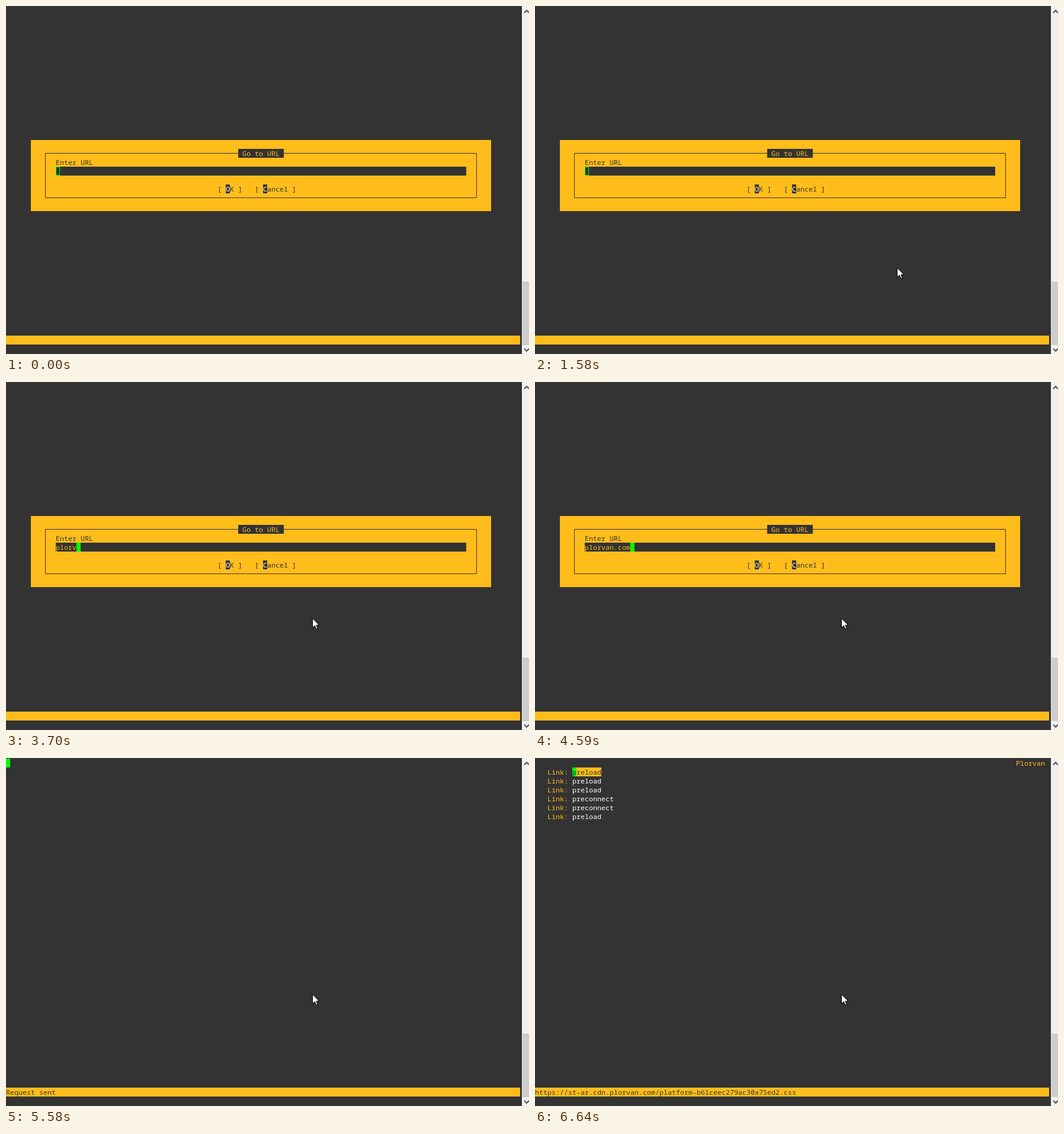
These frames come from a looping animation (883 by 587 pixels, 8 s). An HTML page with a canvas:

```html
<!DOCTYPE html>
<html lang="en">
<head>
<meta charset="utf-8">
<title>Text browser</title>
<style>
  html, body { margin: 0; width: 100%; height: 100%; overflow: hidden; background: #333; }
  canvas { display: block; }
</style>
</head>
<body>
<canvas id="stage" width="883" height="587"></canvas>
<script>
const ctx = document.getElementById('stage').getContext('2d');
const LOOP = 8000, CELL = 7, ROW = 15;
const DARK = '#333333', AMBER = '#ffbd1b', GREEN = '#00ff00', WHITE = '#ffffff';

const URL_TEXT = 'plorvan.com';
const KEY_TIMES = [2840, 3040, 3240, 3430, 3700, 3900, 3970, 4170, 4390, 4490, 4590];
const FOCUS_AT = 1850, SUBMIT_AT = 4790, PAGE_AT = 6440;

// [start, ...values]: the last entry already started is the current one
const POINTER = [
  [250, 724, 527], [320, 650, 470], [390, 613, 441],
  [1580, 611, 441], [1650, 588, 431], [1720, 555, 416], [1780, 530, 404], [1850, 517, 398]
];
const STATUS = [
  [4790, 'Looking up host'], [4990, 'Making connection'], [5190, 'Request sent'],
  [5380, 'SSL negotiation'], [5580, 'Request sent'],
  [6440, 'https://st-ar.cdn.plorvan.com/platform-b61ceec279ac30a75ed2.css']
];
const LINKS = ['preload', 'preload', 'preload', 'preconnect', 'preconnect', 'preload'];

const current = (steps, t) => steps.filter(step => step[0] <= t).pop();
const rowY = row => 1 + row * ROW;

function rect(x, y, w, h, color) {
  ctx.fillStyle = color;
  ctx.fillRect(x, y, w, h);
}

function text(str, x, row, color, back) {
  if (back) rect(x, rowY(row), str.length * CELL, ROW, back);
  ctx.fillStyle = color;
  [...str].forEach((ch, i) => ctx.fillText(ch, x + i * CELL, rowY(row) + 12));
}

function polyline(points, color, width) {
  ctx.beginPath();
  points.forEach(([x, y]) => ctx.lineTo(x, y));
  ctx.strokeStyle = color;
  ctx.lineWidth = width;
  ctx.stroke();
}

function scrollbar() {
  rect(871, 0, 12, 587, '#f0f0f0');
  rect(872, 465, 11, 107, '#cdcdcd');
  polyline([[875, 11.5], [879, 7.5], [883, 11.5]], '#505050', 2);
  polyline([[875, 578], [879, 582], [883, 578]], '#505050', 2);
}

function button(label, x) {
  text(`[ ${label} ]`, x, 20, DARK);
  text(label[0], x + 2 * CELL, 20, WHITE, DARK);
}

function dialog(t) {
  rect(42, 226, 777, 120, AMBER);
  rect(66, 248, 729, 1, DARK);
  rect(66, 323, 729, 1, '#5a2d28');
  rect(66, 248, 1, 76, '#5a2d28');
  rect(794, 248, 1, 76, '#5a2d28');
  text(' Go to URL ', 392, 16, AMBER, DARK);
  text('Enter URL', 84, 17, DARK);
  button('OK', 357);
  button('Cancel', 420);

  rect(84, 271, 693, ROW, DARK);
  const typed = KEY_TIMES.filter(time => time <= t).length;
  text(URL_TEXT.slice(0, typed), 84, 18, AMBER);
  const x = 84 + typed * CELL;
  rect(x, 271, CELL, ROW, GREEN);
  if (t < FOCUS_AT) rect(x + 1, 272, CELL - 2, ROW - 2, DARK);
}

function page() {
  text('Plorvan', 812, 0, AMBER);
  LINKS.forEach((name, i) => {
    text('Link:', 21, i + 1, AMBER);
    text(name, 63, i + 1, i ? WHITE : DARK, i ? null : AMBER);
  });
  text('p', 63, 1, DARK, GREEN);
}

function pointer(x, y) {
  ctx.save();
  ctx.translate(x, y);
  ctx.beginPath();
  [[0.5, 0.8], [0.5, 16.6], [4.3, 13], [6.8, 18.5], [9.2, 17.5], [6.8, 12.2], [11.6, 12]]
    .forEach(([px, py]) => ctx.lineTo(px, py));
  ctx.closePath();
  ctx.fillStyle = WHITE;
  ctx.fill();
  ctx.strokeStyle = '#000';
  ctx.lineWidth = 1;
  ctx.stroke();
  ctx.restore();
}

function draw(t) {
  ctx.font = '11.667px "Noto Sans Mono", "DejaVu Sans Mono", monospace';
  rect(0, 0, 883, 587, DARK);
  rect(0, 556, 868, ROW, AMBER);
  scrollbar();

  if (t < SUBMIT_AT) dialog(t);
  else if (t < PAGE_AT) rect(0, 1, CELL, ROW, GREEN);
  else page();

  const status = current(STATUS, t);
  if (status) text(status[1], 0, 37, DARK);
  const spot = current(POINTER, t);
  if (spot) pointer(spot[1], spot[2]);
}

const start = performance.now();
function tick() {
  draw((performance.now() - start) % LOOP);
  requestAnimationFrame(tick);
}
tick();
</script>
</body>
</html>
```
